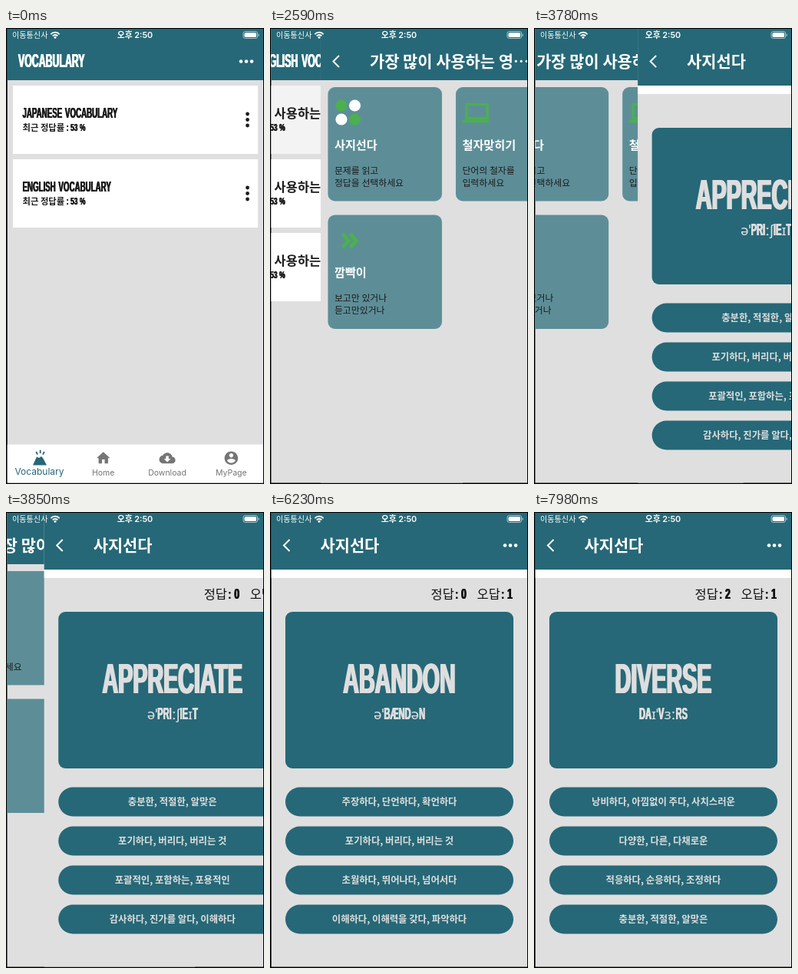
Recreate the animation shown at these times as an HTML page with a canvas. Size 336 by 594 pixels, loop 8000 ms.

```html
<!DOCTYPE html>
<html lang="ko">
<head>
<meta charset="utf-8">
<title>Vocabulary app</title>
<style>
html, body { margin: 0; width: 336px; height: 594px; overflow: hidden; background: #000; }
canvas { display: block; }
</style>
</head>
<body>
<canvas id="stage" width="336" height="594"></canvas>
<script>
const ctx = document.getElementById('stage').getContext('2d');
const LOOP = 8000, STEP = 70, WIDTH = 333.5, LEFT = 1.5;
const TEAL = '#266877', GRAY = '#dfdfdf', GREEN = '#4caf50', PALE = '#dedede', INK = '#1c1c1c';
const KOREAN = '"Noto Sans CJK KR", "Noto Sans CJK JP", "Noto Sans CJK", "Noto Sans", sans-serif';
const CAPS = '"Liberation Sans", Arial, sans-serif';

function box(x, y, w, h, fill, r = 0) {
  ctx.fillStyle = fill;
  ctx.beginPath();
  ctx.roundRect(x, y, w, h, r);
  ctx.fill();
}

function dot(x, y, r, fill) {
  ctx.fillStyle = fill;
  ctx.beginPath();
  ctx.arc(x, y, r, 0, 7);
  ctx.fill();
}

function line(points, color, width) {
  ctx.strokeStyle = color;
  ctx.lineWidth = width;
  ctx.beginPath();
  points.forEach(([x, y]) => ctx.lineTo(x, y));
  ctx.stroke();
}

function plain(text, x, y, font, color, align = 'left') {
  ctx.font = font;
  ctx.fillStyle = color;
  ctx.textAlign = align;
  ctx.fillText(text, x, y);
  ctx.textAlign = 'left';
}

// Mixed text: heavy condensed capitals and digits, regular Hangul.
function write(text, x, y, size, color, weight = 700, centered = false) {
  const runs = text.match(/[A-ZÆ]+|[0-9:%]+|[^A-ZÆ0-9:%]+/g).map(s => {
    const squeeze = /[A-ZÆ]/.test(s) ? 0.51 : /[0-9:%]/.test(s) ? 0.64 : 1;
    const font = squeeze < 1 ? `bold ${size * 1.06}px ${CAPS}` : `${weight} ${size * 0.915}px ${KOREAN}`;
    ctx.font = font;
    return { s, squeeze, font, width: ctx.measureText(s).width * squeeze };
  });
  if (centered) x -= runs.reduce((sum, r) => sum + r.width, 0) / 2;
  ctx.fillStyle = color;
  for (const { s, squeeze, font, width } of runs) {
    ctx.font = font;
    ctx.save();
    ctx.translate(x, y);
    ctx.scale(squeeze, 1);
    if (squeeze < 1) {
      const fat = size * 0.04;
      [-fat, 0, fat].forEach(dx => ctx.fillText(s, dx, 0));
    } else ctx.fillText(s, 0, 0);
    ctx.restore();
    x += width;
  }
}

function header(title, back = true, height = 68) {
  box(LEFT, 0, WIDTH, 594, GRAY);
  box(LEFT, 0, WIDTH, height, TEAL);
  if (back) line([[25.5, 36], [18, 43.5], [25.5, 51]], '#fff', 2);
  write(title, back ? 65.5 : 16, 51, 22.8, '#fff');
  [306, 313, 320].forEach(x => dot(x, 43.5, 2.3, '#fff'));
}

function deck(titles, pressed) {
  titles.forEach((title, i) => {
    const y = 75 + 96 * i;
    box(9, y, 319, 89, i === pressed ? '#f3f3f3' : '#fff');
    write(title, 21.5, y + 42.3, 18, INK);
    write('최근 정답률 : 53 %', 21.5, y + 59, 12.4, INK);
    [37, 44.5, 52].forEach(dy => dot(314.5, y + dy, 2.4, INK));
  });
}

const ICONS = {
  Home: 'M10 20v-6h4v6h5v-8h3L12 3 2 12h3v8z',
  Download: 'M19.35 10.04C18.67 6.59 15.64 4 12 4 9.11 4 6.6 5.64 5.35 8.04 2.34 8.36 0 10.91 0 14c0 3.31 2.69 6 6 6h13c2.76 0 5-2.24 5-5 0-2.64-2.05-4.78-4.65-4.96zM17 13l-5 5-5-5h3V9h4v4h3z',
  MyPage: 'M12 2C6.48 2 2 6.48 2 12s4.48 10 10 10 10-4.48 10-10S17.52 2 12 2zm0 3c1.66 0 3 1.34 3 3s-1.34 3-3 3-3-1.34-3-3 1.34-3 3-3zm0 14.2c-2.5 0-4.71-1.28-6-3.22.03-1.99 4-3.08 6-3.08 1.99 0 5.97 1.09 6 3.08-1.29 1.94-3.5 3.22-6 3.22z'
};

function tabs() {
  box(LEFT, 542.5, WIDTH, 52, '#fff');
  ctx.fillStyle = TEAL;
  ctx.fill(new Path2D('M35 569.5L40 558.5l3 1.5 3-2 2 2L53 569.5z'));
  line([[41, 555.5], [39.3, 552]], TEAL, 1.8);
  line([[44.7, 554], [44.7, 549.8]], TEAL, 1.8);
  line([[48, 555.5], [49.8, 552]], TEAL, 1.8);
  plain('Vocabulary', 43.5, 582, '12px Inter, sans-serif', TEAL, 'center');
  Object.entries(ICONS).forEach(([name, path], i) => {
    const x = 126.7 + 83.3 * i;
    ctx.save();
    ctx.translate(x - 10.5, 549.7);
    ctx.scale(0.88, 0.88);
    ctx.fillStyle = '#757575';
    ctx.fill(new Path2D(path));
    ctx.restore();
    plain(name, x, 583, '10.5px Inter, sans-serif', '#757575', 'center');
  });
}

function tile(x, y, title, lines) {
  box(x, y, 148.5, 148.5, '#5d8e98', 9);
  write(title, x + 8.5, y + 80.5, 16.6, '#fff');
  lines.forEach((text, i) => write(text, x + 8.5, y + 112.5 + 16 * i, 13, INK, 400));
}

function menuPage() {
  header('가장 많이 사용하는 영⋯');
  tile(11, 77, '사지선다', ['문제를 읽고', '정답을 선택하세요']);
  tile(177.5, 77, '철자맞히기', ['단어의 철자를', '입력하세요']);
  tile(11, 243.5, '깜빡이', ['보고만 있거나', '듣고만있거나']);
  [[28.5, 101], [46, 101], [28.5, 119], [46, 119]].forEach(([x, y], i) =>
    dot(x, y, 7.6, i % 3 ? '#fff' : GREEN));
  ctx.strokeStyle = GREEN;
  ctx.lineWidth = 3.4;
  ctx.strokeRect(191.5, 99.5, 27, 18);
  line([[186, 121.5], [221, 121.5]], GREEN, 3.4);
  [30, 40].forEach(x => line([[x, 268], [x + 8, 277], [x, 286]], GREEN, 5));
}

const QUESTIONS = [
  { at: 0, word: 'APPRECIATE', sound: 'əˈPRIːʃIEɪT', right: 0, wrong: 0,
    options: ['충분한, 적절한, 알맞은', '포기하다, 버리다, 버리는 것', '포괄적인, 포함하는, 포용적인', '감사하다, 진가를 알다, 이해하다'] },
  { at: 6230, word: 'ABANDON', sound: 'əˈBÆNDəN', right: 0, wrong: 1,
    options: ['주장하다, 단언하다, 확언하다', '포기하다, 버리다, 버리는 것', '초월하다, 뛰어나다, 넘어서다', '이해하다, 이해력을 갖다, 파악하다'] },
  { at: 6860, word: 'ACQUIRE', sound: 'əˈKWAɪəR', right: 1, wrong: 1,
    options: ['다양한, 다른, 다채로운', '획득하다, 습득하다, 몸에 익혀 얻어내다', '감사하다, 진가를 알다, 이해하다', '적응하다, 순응하다, 조정하다'] },
  { at: 7490, word: 'DIVERSE', sound: 'DAɪˈVɜːRS', right: 2, wrong: 1,
    options: ['낭비하다, 아낌없이 주다, 사치스러운', '다양한, 다른, 다채로운', '적응하다, 순응하다, 조정하다', '충분한, 적절한, 알맞은'] }
];

function score(label, count, x) {
  write(label, x, 113, 18, '#111', 400);
  write(':', x + 32, 112.5, 15, '#111');
  write(String(count), x + 39.5, 113, 18, '#111');
}

function quizPage(t) {
  const q = QUESTIONS.findLast(({ at }) => t >= at);
  header('사지선다', true, 75);
  box(LEFT, 75, WIDTH, 11, '#fff');
  score('정답', q.right, 209.5);
  score('오답', q.wrong, 269.5);
  box(20, 130, 297, 204, TEAL, 9);
  write(q.word, 168.5, 236, 53, PALE, 700, true);
  write(q.sound, 168.5, 270, 20.5, PALE, 400, true);
  q.options.forEach((text, i) => {
    const y = 358.5 + 51 * i;
    box(20, y, 297, 38, TEAL, 19);
    write(text, 168.5, y + 23.4, 13.5, PALE, 700, true);
  });
}

const PAGES = [
  t => {
    header('VOCABULARY', false);
    deck(['JAPANESE VOCABULARY', 'ENGLISH VOCABULARY'], t >= 1190 ? 1 : -1);
    tabs();
  },
  t => {
    header('ENGLISH VOCABULARY');
    deck([1, 2, 3].map(n => '가장 많이 사용하는 영단어 ' + n), t >= 2450 ? 0 : -1);
  },
  menuPage,
  quizPage
];

// Each push: first visible step, end, and the moment its spring was released.
const PUSHES = [
  { begin: 1190, end: 1260, release: 920 },
  { begin: 2450, end: 2870, release: 2438 },
  { begin: 3710, end: 4060, release: 3679 }
];

function spring(ms) {
  const x = ms / 50;
  return 1 - (1 + x) * Math.exp(-x);
}

function showPage(index, x, t) {
  ctx.save();
  ctx.translate(x, 0);
  PAGES[index](t);
  ctx.restore();
}

function statusBar() {
  plain('이동통신사', 8, 13.3, `10.1px ${KOREAN}`, '#fff');
  plain('오후 2:50', 168, 13.3, `600 10.8px Inter, ${KOREAN}`, '#fff', 'center');
  ctx.strokeStyle = '#fff';
  ctx.lineWidth = 1.8;
  [4.5, 7.8].forEach(r => {
    ctx.beginPath();
    ctx.arc(64, 13.5, r, -Math.PI * 0.76, -Math.PI * 0.24);
    ctx.stroke();
  });
  dot(64, 12.3, 1.5, '#fff');
  ctx.strokeStyle = '#a9c3c9';
  ctx.lineWidth = 1;
  ctx.beginPath();
  ctx.roundRect(309, 4.5, 18.5, 9, 2.5);
  ctx.stroke();
  box(310.5, 6, 15.5, 6, '#fff', 1.5);
  box(328.5, 7.5, 1.2, 3, '#a9c3c9', 0.5);
}

function draw(t) {
  ctx.fillStyle = '#000';
  ctx.fillRect(0, 0, 336, 594);
  ctx.save();
  ctx.beginPath();
  ctx.rect(LEFT, 1, WIDTH, 591.5);
  ctx.clip();
  const index = PUSHES.filter(p => t >= p.begin).length;
  const push = PUSHES[index - 1];
  if (push && t < push.end) {
    const stepped = push.begin + Math.floor((t - push.begin) / STEP) * STEP;
    const p = spring(stepped - push.release);
    showPage(index - 1, -104 * p, t);
    showPage(index, WIDTH * (1 - p), t);
  } else showPage(index, 0, t);
  statusBar();
  ctx.restore();
}

const start = performance.now();
function tick() {
  draw((performance.now() - start) % LOOP);
  requestAnimationFrame(tick);
}
tick();
</script>
</body>
</html>
```
